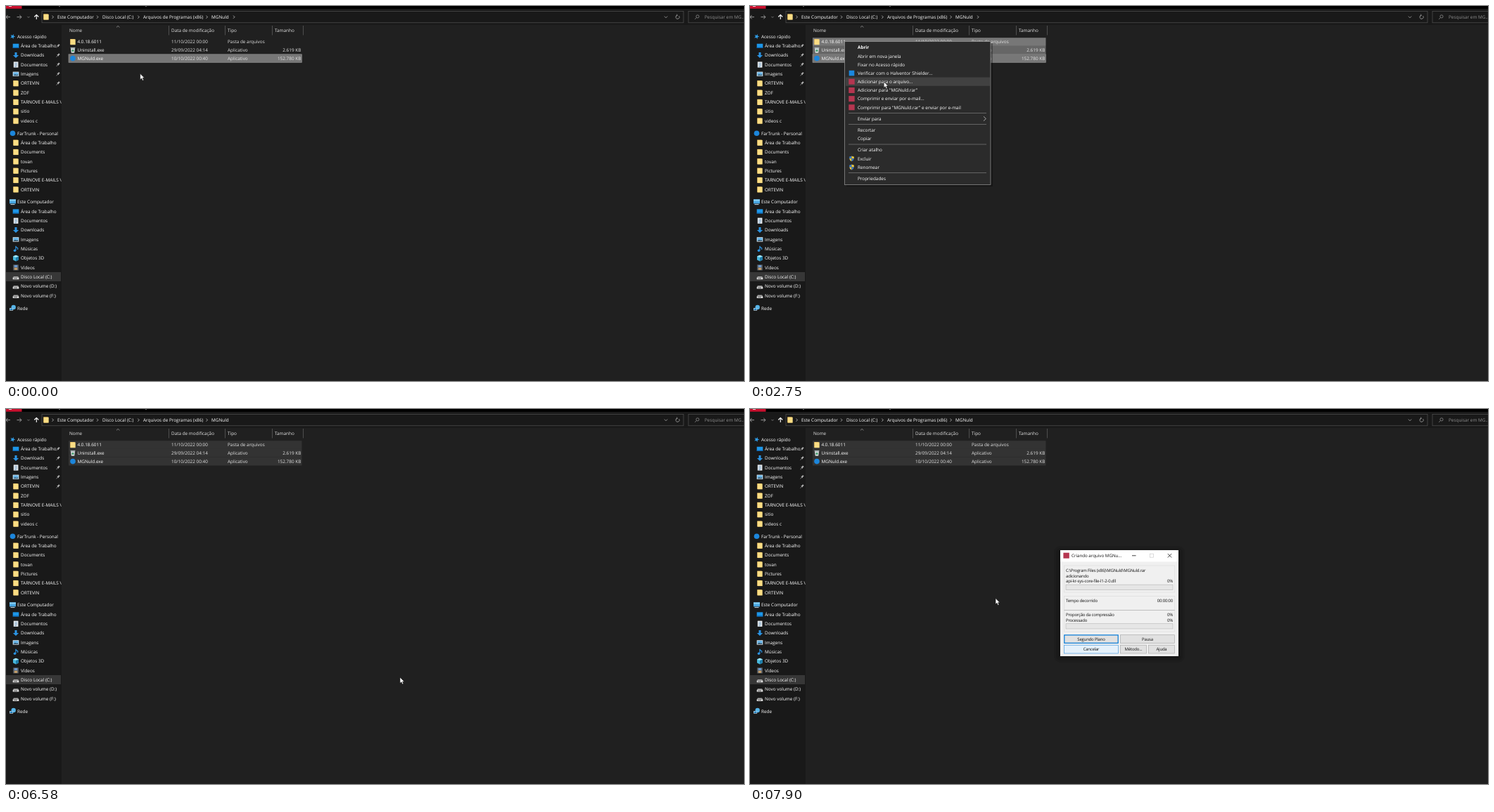
Write an HTML page that moves like this. It is 1049 px wide and 534 px high and loops after 8000 ms.

```html
<!DOCTYPE html>
<html lang="pt-BR">
<head>
<meta charset="utf-8">
<title>Compactar pasta</title>
<style>
html, body { margin: 0; width: 100%; height: 100%; overflow: hidden; background: #000; }
svg { display: block; width: 100%; height: 100%; }
text { font: 6.4px "Open Sans", "Noto Sans", sans-serif; white-space: pre; text-rendering: geometricPrecision; }
.dlg text { font-size: 6px; letter-spacing: -.2px; }
.dlg .title { font-size: 6.2px; letter-spacing: 0; }
</style>
</head>
<body>
<svg id="stage" viewBox="0 0 1049 534" preserveAspectRatio="none"></svg>
<script>
const LOOP = 8000, APP = 'MGNuld';

// ---- markup helpers ----
const rect = (x, y, w, h, fill, extra = '') =>
  `<rect x="${x}" y="${y}" width="${w}" height="${h}" fill="${fill}" ${extra}/>`;
const box = (x, y, w, h, fill, stroke, sw = .7) =>
  rect(x, y, w, h, fill, `stroke="${stroke}" stroke-width="${sw}"`);
const line = (d, stroke, sw = .7) =>
  `<path d="${d}" fill="none" stroke="${stroke}" stroke-width="${sw}"/>`;
const fillPath = (d, fill) => `<path d="${d}" fill="${fill}"/>`;
const dot = (x, y, r, fill, extra = '') => `<circle cx="${x}" cy="${y}" r="${r}" fill="${fill}" ${extra}/>`;
// y is the middle of the capitals
const text = (x, y, s, fill = '#fff', extra = '') =>
  `<text x="${x}" y="${y + 2.3}" fill="${fill}" ${extra}>${s}</text>`;
const right = 'text-anchor="end"', mid = 'text-anchor="middle"';
const group = (id, body, extra = '') => `<g id="${id}" ${extra}>${body}</g>`;
const chevron = (x, y, c) => line(`M${x - 1} ${y - 2}l2 2l-2 2`, c, .8);
const down = (x, y, c, r = 2.2) => line(`M${x - r} ${y - r / 2}l${r} ${r}l${r} ${-r}`, c, .8);
const cross = (x, y, c, r = 2.7) =>
  line(`M${x - r} ${y - r}l${2 * r} ${2 * r}M${x + r} ${y - r}l${-2 * r} ${2 * r}`, c, .8);

// ---- small icons, centred on x, y ----
const icon = {
  folder: (x, y) => rect(x - 3.8, y - 4, 6.5, 8, '#e3b354') + rect(x - 3.3, y - 3.6, 7, 7.8, '#fbdd84'),
  star: (x, y) => {
    const pts = Array.from({ length: 10 }, (_, i) => {
      const r = i % 2 ? 1.6 : 3.8, a = i * Math.PI / 5 - 1.2;
      return (x + r * Math.cos(a)).toFixed(1) + ' ' + (y + r * Math.sin(a)).toFixed(1);
    });
    return fillPath('M' + pts.join('L') + 'z', '#2f9be6');
  },
  desktop: (x, y) => rect(x - 4.3, y - 3, 8.6, 6.2, '#1d96e8') + rect(x - 4.3, y + 2, 8.6, 1.2, '#0b62ad'),
  download: (x, y) => fillPath(`M${x - 1.5} ${y - 4}h3v4h2.6l-4.1 4l-4.1-4h2.6z`, '#2b94e4'),
  page: (x, y) => rect(x - 3.2, y - 4, 6.6, 8.2, '#e8ecef') +
    line(`M${x - 1.8} ${y - 1.8}h3.8m-3.8 1.7h3.8m-3.8 1.7h3.8m-3.8 1.6h2.6`, '#5f8fb6', .7),
  image: (x, y) => rect(x - 4.3, y - 3.1, 8.6, 6.4, '#eef3f6') + rect(x - 3.6, y - 2.4, 7.2, 5, '#68b5e8') +
    fillPath(`M${x - 3.6} ${y + 2.6}l2.5-2.4l1.7 1.2l1.7-.8l1.3 2z`, '#39576b'),
  note: (x, y) => dot(x - 1.5, y + 2.5, 1.8, '#2b94e4') +
    line(`M${x - .1} ${y + 2.5}v-6.4q.4 2 2.5 2.6q1 1.2 0 2.6`, '#2b94e4', 1.1),
  cube: (x, y) => fillPath(`M${x} ${y - 4.2}l4 1.6v5l-4 2l-4-2v-5z`, '#47b7dc') +
    fillPath(`M${x} ${y - 1}l4-1.6v5l-4 2z`, '#1f7da8') + fillPath(`M${x - 4} ${y - 2.6}l4-1.6l4 1.6l-4 1.6z`, '#a5e4f5'),
  film: (x, y) => rect(x - 3.8, y - 4, 7.6, 8, '#5b6168') + rect(x - 2.1, y - 3.4, 4.2, 3, '#6c9ad0') +
    rect(x - 2.1, y + .4, 4.2, 3, '#c7a06a'),
  drive: (x, y) => fillPath(`M${x - 3} ${y - .8}h6l1.3 1.8h-8.6z`, '#9c9c9c') + rect(x - 4.3, y + 1, 8.6, 2.6, '#e3e3e3') +
    rect(x - 2.8, y + 1.8, 4.8, .9, '#454545'),
  pc: (x, y) => rect(x - 4.5, y - 3.6, 9, 6, '#49a7e2') + rect(x - 4.5, y - 3.6, 9, 2.4, '#84cbf2') +
    rect(x - 3, y + 3, 6, 1.1, '#b9c7d1'),
  net: (x, y) => dot(x + 1.2, y - 1.2, 3.2, '#56b4e8') + rect(x - 4.4, y - .2, 5, 3.6, '#d3e7f3') +
    rect(x - 3.8, y + .4, 3.8, 2.4, '#2380bd'),
  disc: (x, y) => dot(x, y, 3.8, '#1c86dc'),
  bin: (x, y) => fillPath(`M${x - 3} ${y - 2.6}h6l-.8 6.6h-4.4z`, '#d5dcdd') + rect(x - 3.4, y - 3.8, 6.8, 1.2, '#a9b6b8') +
    dot(x, y + .8, 1.5, '#3f9a66'),
  shield: (x, y) => {
    const q = (sx, sy, c) => fillPath(sy < 0 ? `M${x} ${y - 3.8}q${sx * 1.6} 1 ${sx * 3.3} 1v2.8H${x}z`
      : `M${x} ${y}h${sx * 3.3}q${-sx * .3} 2.6 ${-sx * 3.3} 4z`, c);
    return q(-1, -1, '#3a79c9') + q(1, -1, '#f2cc3e') + q(-1, 1, '#f2cc3e') + q(1, 1, '#3a79c9');
  },
  guard: (x, y) => rect(x - 3.8, y - 3.8, 7.6, 7.6, '#1b87dd'),
  pack: (x, y) => rect(x - 4.2, y - 4, 8.4, 8, '#b53650'),
  pin: (x, y) => line(`M${x - 2.4} ${y + 2.6}l2.2-2.3`, '#b5b5b5', .7) +
    fillPath(`M${x - 1.8} ${y - .9}l1.6-.2l1.2-1.7l1.7 1.7l-1.7 1.2l-.2 1.6z`, '#b5b5b5')
};

// ---- explorer window ----
function sidebar() {
  const pitch = 13.34, work = 'Área de Trabalho', mails = 'TARNOVE E-MAILS V';
  const list = (y, head, items) => icon[head[0]](9.5, y) + text(16, y, head[1]) +
    items.map(([ic, label, pin], i) => {
      const cy = y + pitch * (i + 1);
      return icon[ic](14, cy) + text(21, cy, label) + (pin ? icon.pin(74, cy) : '');
    }).join('');
  const f = s => ['folder', s];
  return rect(0, 379, 78, 13, '#373737') +
    list(43.4, ['star', 'Acesso rápido'], [['desktop', work, 1], ['download', 'Downloads', 1], ['page', 'Documentos', 1],
      ['image', 'Imagens', 1], ['folder', 'ORTEVIN', 1], f('ZOF'), f(mails), f('sitio'), f('videos c')]) +
    list(181.2, ['disc', 'FarTrunk - Personal'], [work, 'Documents', 'tovan', 'Pictures', mails, 'ORTEVIN'].map(f)) +
    list(279, ['pc', 'Este Computador'], [['desktop', work], ['page', 'Documentos'], ['download', 'Downloads'],
      ['image', 'Imagens'], ['note', 'Músicas'], ['cube', 'Objetos 3D'], ['film', 'Vídeos'],
      ['drive', 'Disco Local (C:)'], ['drive', 'Novo volume (D:)'], ['drive', 'Novo volume (F:)']]) +
    list(430.2, ['net', 'Rede'], []);
}

function topBar() {
  const y = 15.7, c = '#a8a8a8';
  return rect(0, 0, 1049, 4, '#000') + rect(0, 0, 22.5, 3.8, '#c8102e') + rect(4, 0, 4, 1, '#f0c8ce') +
    rect(75, 0, 2, .8, '#777') + rect(198, 0, 2, .8, '#777') +
    box(51, 7.5, 912, 16.3, '#191919', '#535353') + box(970, 7.5, 90, 16.3, '#191919', '#535353') +
    line(`M6 ${y}H0M2.6 ${y - 2.7}L0 ${y}l2.6 2.7`, c, .9) +
    line(`M15.5 ${y}h6.5m-2.7-2.7l2.7 2.7l-2.7 2.7`, c, .9) + down(32, y, '#888', 1.6) +
    line(`M43.3 ${y + 3.4}v-6.6m-3 3l3-3l3 3`, '#fff', 1.1) + icon.folder(57, 15.4) +
    [66.5, 130, 188.3, 285.5].map(x => chevron(x, y, '#ccc')).join('') +
    group('tail', chevron(324, y, '#ccc')) +
    text(73, y, 'Este Computador') + text(137, y, 'Disco Local (C:)') +
    text(195, y, 'Arquivos de Programas (x86)') + text(292, y, APP) +
    down(938, y, c) + line(`M956.7 ${y - 1.5}a2.6 2.6 0 1 1 -2.6 -1m-1-1.4l1.4 1.4l-1.5 1.2`, c, .8) +
    dot(983, y - .8, 2.1, 'none', 'stroke="#999" stroke-width=".7"') + line(`M981.5 ${y + .8}l-2.4 2.4`, '#999') +
    text(993, y, `Pesquisar em ${APP.slice(0, 2)}...`, '#8f8f8f');
}

const rowTop = i => 45.2 + 11.8 * i;

function fileList() {
  const rows = [['folder', '4.0.18.6011', '11/10/2022 00:00', 'Pasta de arquivos', ''],
    ['bin', 'Uninstall.exe', '29/09/2022 04:14', 'Aplicativo', '2.619 KB'],
    ['disc', APP + '.exe', '10/10/2022 00:40', 'Aplicativo', '152.780 KB']];
  const head = [[90, 'Nome'], [235, 'Data de modificação'], [315, 'Tipo'], [382, 'Tamanho']];
  return head.map(([x, s]) => text(x, 35, s, '#e4e4e4')).join('') +
    [231.5, 311.5, 378.5, 422.5].map(x => line(`M${x} 28V41.5`, '#636363')).join('') +
    line('M157 30.4l2.2-2l2.2 2', '#aaa') +
    rows.map(([ic, name, date, type, size], i) => {
      const y = rowTop(i) + 5.8;
      return rect(89, rowTop(i), 331.5, 11.7, 'none', `id="row${i}" stroke-width=".6"`) + icon[ic](95, y) +
        text(101.5, y, name) + text(235, y, date, '#e4e4e4') + text(315, y, type, '#e4e4e4') +
        text(419.3, y, size, '#e4e4e4', right);
    }).join('');
}

// ---- context menu ----
const MENU = [[59, 'Abrir'], [71.2, 'Abrir em nova janela'], [83.3, 'Fixar no Acesso rápido'],
  [95.6, 'Verificar com o Halventor Shielder...', 'guard'], [107.7, 'Adicionar para o arquivo...', 'pack'],
  [120, `Adicionar para "${APP}.rar"`, 'pack'], [132.1, 'Comprimir e enviar por e-mail...', 'pack'],
  [144.3, `Comprimir para "${APP}.rar" e enviar por e-mail`, 'pack'], [160.5, 'Enviar para'], [176.6, 'Recortar'],
  [188.8, 'Copiar'], [205, 'Criar atalho'], [217.2, 'Excluir', 'shield'], [229.4, 'Renomear', 'shield'], [245.5, 'Propriedades']];

function menu() {
  return rect(137, 53, 208, 204, '#000', 'opacity=".3"') + box(134.6, 50.6, 207.4, 203.8, '#2b2b2b', '#9a9a9a') +
    rect(136, 0, 205, 12.2, '#414141', 'id="hover"') +
    [152.5, 168.5, 197, 237.5].map(y => line(`M140 ${y}H336`, '#7d7d7d')).join('') +
    line('M332 157.3l3.4 3.2l-3.4 3.2', '#ddd') +
    MENU.map(([y, s, ic], i) => (ic ? icon[ic](144.5, y) : '') +
      text(153, y, s, '#fff', i ? '' : 'font-weight="700" style="font-weight:700"')).join('');
}

// ---- light dialogs ----
const INK = '#111', BLUE = '#0078d7';
const label = (x, y, s, extra) => text(x, y, s, INK, extra);
const button = (x, y, w, h, s, stroke = '#adadad', sw = .7, fill = '#e1e1e1', id = '') =>
  rect(x, y, w, h, fill, `stroke="${stroke}" stroke-width="${sw}" ${id && `id="${id}"`}`) + label(x + w / 2, y + h / 2, s, mid);
const combo = (x, y, w, s, fill = '#e1e1e1') =>
  box(x, y, w, 11.6, fill, '#adadad') + label(x + 2, y + 5.8, s) + down(x + w - 4.8, y + 6, '#444');
const frame = (x, y, w, h, s) => box(x, y, w, h, 'none', '#dcdcdc') +
  (s ? rect(x + 3.5, y - 3, s.length * 3.05, 6, '#fff') + label(x + 5, y, s) : '');
const shell = (x, y, w, h, bar) =>
  [9, 6, 3].map(d => rect(x - d, y - d + 3, w + 2 * d, h + 2 * d - 3, '#000', `opacity=".1" rx="${d}"`)).join('') +
  rect(x, y, w, h, '#f0f0f0') + rect(x, y, w, bar, '#fff');

function archiveDialog() {
  const tabs = [[409, 'Avançado'], [442, 'Opções'], [469, 'Arquivos'], [499, 'Segurança'], [533, 'Horário'], [560, 'Comentários']];
  const checks = ['Excluir arquivos após compressão', 'Criar arquivo SFX', 'Criar arquivo sólido',
    'Adicionar registro de recuperação', 'Testar arquivos comprimidos', 'Bloquear arquivo'];
  return shell(381, 158, 288, 236, 17) + icon.pack(390.2, 166.4) +
    text(398, 166.6, 'Nome e parâmetros do arquivo', INK, 'class="title"') +
    text(631, 166.4, '?', INK, mid) + cross(656, 166.4, INK) +
    tabs.map(([x, s], i) => {
      const end = i < 5 ? tabs[i + 1][0] : 600;
      return box(x, 180.3, end - x, 10, '#f0f0f0', '#d9d9d9') + label((x + end) / 2, 185.7, s, mid);
    }).join('') +
    box(385, 190.3, 279.5, 183, '#fff', '#dcdcdc') + box(385, 178.5, 24, 12, '#fff', '#dcdcdc') +
    rect(385.4, 189.8, 23.2, 1.2, '#fff') + label(396.5, 184.6, 'Geral', mid) +
    label(396, 204.6, 'Nome do arquivo') + button(607, 196.7, 47.5, 12.2, 'Procurar...') +
    box(396.4, 210.6, 258.2, 11.6, '#fff', BLUE) + rect(399, 212.2, 34, 8.2, BLUE) +
    text(399.6, 216.2, APP + '.rar') + rect(432.2, 212, .8, 8.4, INK, 'id="caret"') + down(649.8, 216.6, '#444') +
    label(396, 230.6, 'Perfil Padrão') + button(396.6, 235, 107.4, 12, 'Perfis...') +
    label(514.6, 230.6, 'Método de atualização') + combo(515, 234.8, 140, 'Adicionar e substituir arquivos') +
    frame(396.4, 259.5, 107.6, 22.5, 'Formato do arquivo') +
    [[405.5, 'RAR'], [439, 'RAR4'], [474.5, 'ZIP']].map(([x, s], i) =>
      dot(x, 271.5, 3.4, '#fff', 'stroke="#333" stroke-width=".7"') + (i ? '' : dot(x, 271.5, 1.8, '#222')) +
      label(x + 5.4, 271.6, s)).join('') +
    frame(515, 259.5, 140, 75.5, 'Opções de Compressão') +
    checks.map((s, i) => {
      const y = 271.5 + 10.8 * i;
      return box(521, y - 3.4, 6.8, 6.8, '#fff', '#333') + label(529.6, y + .1, s);
    }).join('') +
    label(396, 291.6, 'Método de compressão') + combo(396.4, 296.2, 107.6, 'Normal') +
    label(396, 317.6, 'Tamanho do dicionário') + combo(396.4, 322.4, 107.6, '32 MB') +
    label(396, 343.6, 'Dividir para volumes, tamanho') + combo(396.4, 348.5, 76.6, '', '#fff') + combo(475, 348.5, 29, 'MB') +
    button(515.3, 348.5, 139.4, 12, 'Definir senha...', '#adadad', .7, '#e1e1e1', 'pass') +
    button(534.6, 378.2, 40, 11.2, 'OK', BLUE, 1.2, '#e1e1e1', 'ok') + button(579.4, 378, 40.4, 11.6, 'Cancelar') +
    button(624.4, 378, 40.4, 11.6, 'Ajuda');
}

function progressDialog() {
  const bar = y => box(449, y, 152, 7.3, '#e6e6e6', '#bcbcbc');
  return shell(441, 201, 168, 151, 16.5) + icon.pack(449.6, 208.7) +
    text(457, 208.9, `Criando arquivo ${APP.slice(0, 4)}...`, INK, 'class="title"') +
    line('M543 208.8h5.6', INK, .8) + box(568.4, 206.2, 5, 5, 'none', '#ccc') + cross(596.5, 208.8, INK) +
    frame(446.4, 223, 157.4, 38) + frame(446.4, 266.5, 157.4, 50.5) +
    label(449, 230, `C:\\Program Files (x86)\\${APP}\\${APP}.rar`) + label(449, 237.2, 'adicionando') +
    label(449, 244.6, 'api-kr-sys-core-file-l1-2-0.dll') + label(601, 244.6, '0%', right) + bar(250.2) +
    label(449, 273, 'Tempo decorrido') + label(601, 273, '00:00:00', right) + line('M446.4 286.5H603.8', '#a9a9a9') +
    label(449, 292.6, 'Proporção da compressão') + label(601, 292.6, '0%', right) +
    label(449, 300.6, 'Processado') + label(601, 300.6, '0%', right) + bar(305.7) +
    button(446.8, 321.9, 76.4, 11.4, 'Segundo Plano', BLUE, 1.2) + button(526.5, 321.7, 77, 11.8, 'Pausa') +
    button(446.6, 336.2, 76.8, 11.8, 'Cancelar', '#4a9ce0', .7, '#e5f1fb') +
    button(526.5, 336.2, 37, 11.8, 'Método...') + button(566.5, 336.2, 37, 11.8, 'Ajuda');
}

document.getElementById('stage').innerHTML =
  '<clipPath id="side"><rect width="78.5" height="534"/></clipPath>' +
  rect(0, 0, 1049, 534, '#191919') + rect(79, 27, 970, 507, '#202020') +
  group('nav', sidebar(), 'clip-path="url(#side)"') + topBar() + fileList() +
  group('menu', menu()) + group('archive', archiveDialog(), 'class="dlg"') +
  group('progress', progressDialog(), 'class="dlg"') +
  group('cursor', '<path d="M0 0V8.6L2 6.8L3.4 10L5 9.3L3.6 6.2H6.2Z" fill="#fff" stroke="#111" stroke-width=".6"/>') +
  rect(0, 0, 1049, 534, '#000', 'id="black"');

// ---- timing ----
const $ = Object.fromEntries([...document.querySelectorAll('[id]')].map(e => [e.id, e]));
const set = (el, attrs) => Object.entries(attrs).forEach(([k, v]) => el.setAttribute(k, v));
const show = (el, on) => set(el, { visibility: on ? 'visible' : 'hidden' });

// bursts of screen updates: start, end, count
const BURSTS = [[120, 1110, 8], [1260, 2300, 8], [2450, 2750, 3], [3500, 4500, 8], [4650, 5530, 7],
  [5820, 5820, 1], [6430, 6730, 3], [7610, 7900, 3]];
function snap(t) {
  let at = 0;
  for (const [a, b, n] of BURSTS) {
    if (t < a) break;
    const step = (b - a) / (n - 1 || 1) || 1;
    at = a + step * Math.min(n - 1, Math.floor((t - a + 16) / step));
  }
  return at;
}

const PATH = [[0, 190.7, 96.3], [270, 200, 108], [690, 142, 6], [1110, 135, 47.6], [1560, 136, 49], [2300, 184, 92],
  [2750, 190.2, 107.8], [3930, 190.2, 107.8], [4500, 470, 310], [5090, 574, 362], [5237, 568.5, 380],
  [5530, 560, 382], [6730, 560, 382], [6731, 349, 269.5], [LOOP, 349, 269.5]];
function cursorAt(t) {
  const i = Math.max(1, PATH.findIndex(p => p[0] >= t));
  const [t0, x0, y0] = PATH[i - 1], [t1, x1, y1] = PATH[i];
  const k = (t - t0) / (t1 - t0);
  return [x0 + (x1 - x0) * k, y0 + (y1 - y0) * k];
}

function appear(el, k, cx, cy) {
  show(el, k > 0);
  const s = 1 - .055 * (1 - k);
  set(el, { opacity: k, transform: `translate(${cx} ${cy}) scale(${s}) translate(${-cx} ${-cy})` });
}

function draw(time) {
  const t = snap(time), [x, y] = cursorAt(t);
  set($.cursor, { transform: `translate(${x} ${y})` });

  const dim = t >= 3600, firstSelected = t < 390 ? 2 : t < 530 ? 1 : 0;
  for (let i = 0; i < 3; i++) {
    const fill = dim ? '#333' : i < firstSelected ? 'none' : i === 1 ? '#666' : '#777';
    set($['row' + i], { fill, stroke: !dim && i === 2 ? '#909090' : 'none' });
  }
  show($.tail, t < 3500);

  show($.menu, t >= 1400 && t < 3500);
  const item = MENU.find(m => Math.abs(m[0] - y) <= 6.1);
  const hovering = item && x > 136.5 && t >= 1400 && t < 3500;
  show($.hover, hovering);
  if (hovering) set($.hover, { y: item[0] - 6.1 });

  const opening = t < 3700 ? 0 : t < 3900 ? .62 : 1;
  appear($.archive, t < 6570 ? opening : 0, 525, 276);
  show($.caret, opening === 1 && t < 5820 && (t < 4760 || t > 5290));
  const onPass = t >= 4930 && t < 5300;
  set($.pass, { fill: onPass ? t > 5200 ? '#e3ebf2' : '#e5f1fb' : '#e1e1e1', stroke: onPass ? '#4a9ce0' : '#adadad' });
  set($.ok, { fill: t >= 6430 ? '#cce4f7' : t >= 5300 ? '#e5f1fb' : '#e1e1e1' });

  appear($.progress, t < 7700 ? 0 : t < 7890 ? .62 : 1, 525, 276.5);
  show($.black, t >= 6725 && t < 7610);
}

function tick() {
  draw(performance.now() % LOOP);
  requestAnimationFrame(tick);
}
tick();
</script>
</body>
</html>
```
